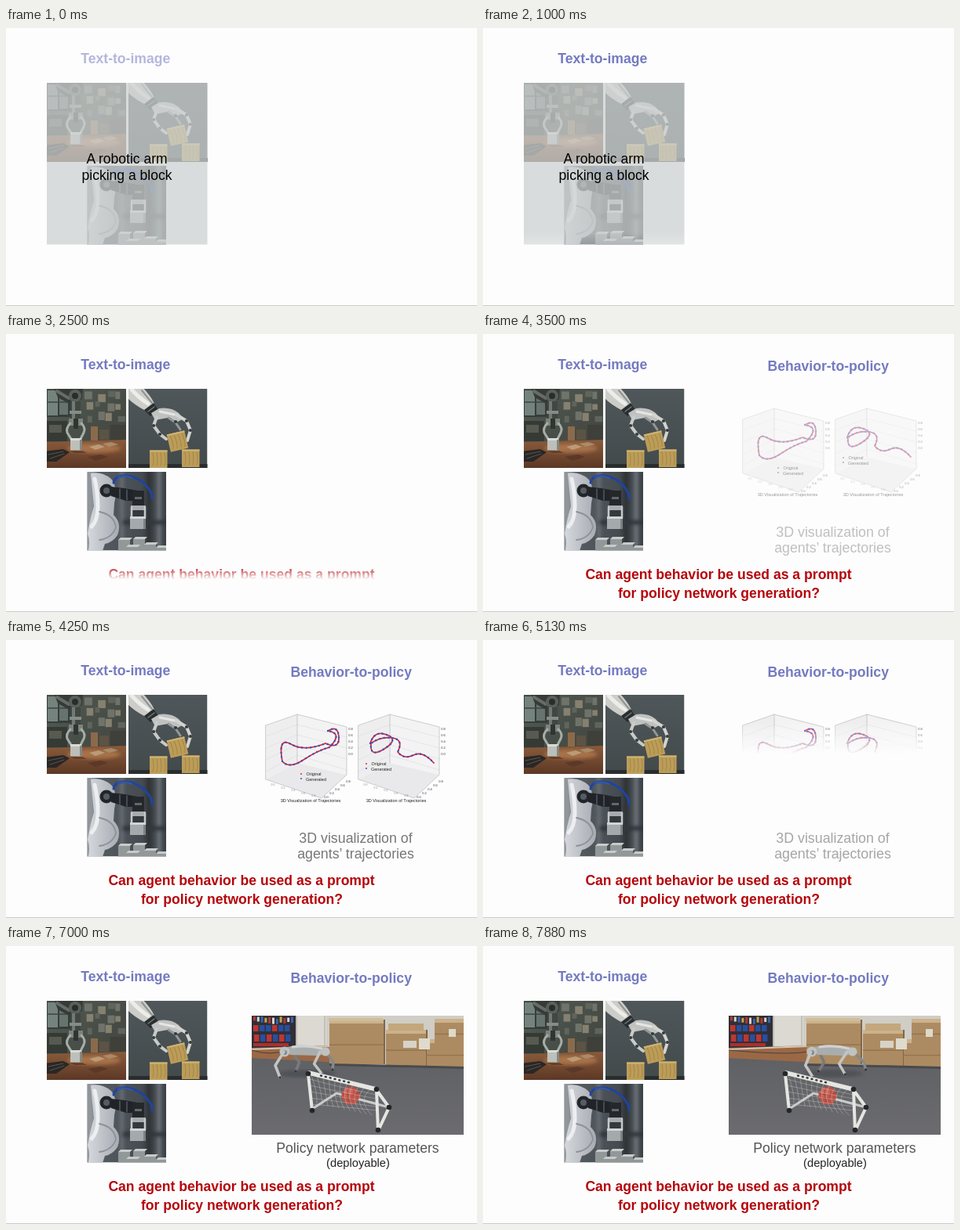
These frames come from a looping animation (600x355 px, 8 s). An HTML page:

```html
<!DOCTYPE html>
<html lang="en">
<head>
<meta charset="utf-8">
<title>Behavior to policy</title>
<style>
html, body { margin: 0; width: 100%; height: 100%; overflow: hidden; background: #fdfdfd; }
#stage { display: block; width: 600px; height: 355px; }
text { font-family: "Liberation Sans", Arial, sans-serif; text-anchor: middle; }
</style>
</head>
<body>
<svg id="stage" viewBox="0 0 600 355"></svg>
<script>
const LOOP = 8000, STEP = 125;
const stage = document.getElementById('stage');

// Drawing helpers
const rect = (x, y, w, h, fill, extra = '') =>
  `<rect x="${x}" y="${y}" width="${w}" height="${h}" fill="${fill}" ${extra}/>`;
const circle = (x, y, r, fill, extra = '') =>
  `<circle cx="${x}" cy="${y}" r="${r}" fill="${fill}" ${extra}/>`;
const shape = (d, fill, extra = '') => `<path d="${d}" fill="${fill}" ${extra}/>`;
const line = (d, color, width, extra = '') =>
  `<path d="${d}" fill="none" stroke="${color}" stroke-width="${width}" stroke-linejoin="round" stroke-linecap="round" ${extra}/>`;
const label = (str, x, y, size, fill, extra = '') =>
  `<text x="${x}" y="${y}" font-size="${size}" fill="${fill}" ${extra}>${str}</text>`;
const group = (id, content, extra = '') => `<g id="${id}" ${extra}>${content}</g>`;
const soft = (content, filter) => `<g filter="url(#${filter})">${content}</g>`;
// A clipped picture: plain backdrop plus slightly softened content
const photo = (x, y, w, h, backdrop, content) =>
  `<svg x="${x}" y="${y}" width="${w}" height="${h}" viewBox="${x} ${y} ${w} ${h}">` +
  rect(x, y, w, h, backdrop) + soft(content, 'lens') + '</svg>';
const blur = (id, amount) => `<filter id="${id}"><feGaussianBlur stdDeviation="${amount}"/></filter>`;
const gradient = (id, from, to, extra = '') =>
  `<linearGradient id="${id}" ${extra}><stop offset="0" stop-color="${from}"/><stop offset="1" stop-color="${to}"/></linearGradient>`;
const wipeMask = id =>
  gradient(id + 'Edge', '#fff', '#000', 'gradientUnits="userSpaceOnUse" x1="0" x2="0"') +
  `<mask id="${id}" maskUnits="userSpaceOnUse" x="0" y="0" width="600" height="355">${rect(0, 0, 600, 355, `url(#${id}Edge)`)}</mask>`;
const range = n => [...Array(n).keys()];
const BOLD = 'font-weight="bold"', DOWN = 'x1="0" y1="0" x2="0" y2="1"';

function random(seed) {
  return () => (seed = (seed * 16807) % 2147483647) / 2147483647;
}

function workshop() {
  const rnd = random(41);
  const papers = range(12).map(i =>
    rect(100 + (i % 4) * 13 + rnd() * 5, 71 + Math.floor(i / 4) * 14 + rnd() * 6, 5 + rnd() * 5, 6 + rnd() * 5,
      ['#6f736a', '#86806f', '#5f655d'][i % 3])).join('');
  return photo(52, 70, 101, 101, 'url(#wall)',
    rect(52, 71, 31, 35, '#363e3b') + rect(53, 72, 13, 32, '#75837e') + rect(68, 72, 11, 31, '#66736e') +
    line('M52 87H80', '#3d4642', 1.5) + papers +
    rect(50, 111, 28, 26, '#353a34') + rect(55, 116, 16, 10, '#565a50') +
    rect(108, 118, 9, 18, '#8b6a4b') + rect(119, 122, 12, 13, '#5d5344') + rect(133, 116, 22, 20, '#3e4039') +
    shape('M48 138L157 135V175H48Z', 'url(#table)') +
    soft('<ellipse cx="112" cy="146" rx="34" ry="6" fill="#b67d50" opacity=".75"/>', 'haze') +
    shape('M48 150L73 147 81 151 64 163H48Z', '#292725') + line('M54 154L73 150M56 159L74 153', '#5c554f', 1) +
    shape('M106 144l12-3 8 3-12 4Z', '#b99b7a') + shape('M123 140l11-2 9 3-12 3Z', '#a98a6b') +
    shape('M104 157l17-3 9 3-16 5Z', '#5b3827') +
    shape('M61 68H98L97 83 84 91 66 81Z', '#373b38') + line('M65 73L80 82', '#666c67', 4) +
    circle(88, 79, 8, '#59605b') + circle(88, 79, 4, '#292d2b') +
    rect(82, 86, 13, 23, '#414743') + rect(84, 86, 4, 23, '#727a74') + rect(81, 98, 15, 4, '#868d87') +
    rect(80, 108, 18, 9, '#7d847e') + rect(86, 108, 6, 13, '#303532') +
    line('M82 114Q76 120 78 126L83 134M96 114Q102 120 99 126L95 134', '#a6aea8', 3) +
    rect(82, 134, 13.5, 14.5, '#bdbfba') + rect(82, 133, 14, 3, '#dadbd6') + rect(94, 135, 3, 13, '#858781') +
    shape('M81 149H97L103 152H88Z', '#4a2c20', 'opacity=".6"'));
}

function woodBlock(x, y, size, angle = 0) {
  const grain = range(4).map(i => `M${x + 4 + i * size / 4.5} ${y + 3}q2 ${size / 2} 0 ${size - 6}`).join('');
  return `<g transform="rotate(${angle} ${x + size / 2} ${y + size / 2})">` +
    rect(x, y, size, size, '#bc9d58') + line(grain, '#a28449', 1) + rect(x, y, size, 2, '#d0b574') + '</g>';
}

function handWithBlocks() {
  return photo(156, 70, 100.5, 101, 'url(#slate)',
    rect(150, 166, 112, 8, '#292d2e') +
    shape('M152 66H172Q184 78 189 89L178 98Q163 91 152 79Z', '#cccdc9') +
    line('M160 71Q170 82 181 89', '#ecece8', 5) + line('M173 72L186 88', '#8f9392', 2) +
    shape('M176 97L188 88 194 97 184 105Z', '#292e30') + line('M181 99L189 93', '#74797a', 1.5) +
    shape('M185 101L195 95Q210 93 220 101L226 108 219 112 206 107 190 110Z', '#bfc2c0') +
    line('M196 99L215 103', '#e5e6e1', 3) +
    line('M192 106L188 117 196 128 204 134', '#c9cbc8', 4) +
    line('M217 103L230 111 235 123 231 136', '#d3d4d0', 4) + line('M207 107L216 113 222 122', '#929797', 3) +
    [[188, 117], [196, 128], [230, 111], [235, 123], [216, 112]].map(p => circle(...p, 2.1, '#353a3b')).join('') +
    woodBlock(207, 125.5, 23, -13) + woodBlock(183, 148.5, 22.5) + woodBlock(224, 147.5, 22.5));
}

function labArm() {
  const cubes = [[143, 263], [162, 262], [176, 269], [153, 272], [191, 273]].map(([x, y]) =>
    rect(x, y, 15, 15, '#929798') + shape(`M${x} ${y}l3-3h15l-3 3Z`, '#c7cbca')).join('');
  return photo(103.5, 176, 100.5, 100.5, 'url(#lab)',
    soft(rect(100, 172, 13, 108, '#91969b') + rect(145, 172, 5, 108, '#676d72') +
      rect(178, 172, 8, 108, '#303539') + rect(192, 172, 6, 108, '#6b7176') + rect(148, 237, 60, 7, '#33383c'), 'haze') +
    shape('M108 178Q122 175 134 185Q143 196 138 216L137 231Q148 241 142 257Q136 266 126 268L122 280H104Q108 266 104 255Q107 236 112 220Z', 'url(#metal)') +
    line('M113 185Q117 202 117 220T109 246', '#eceef0', 5) +
    line('M119 227Q138 231 140 247Q135 261 119 263', '#8c9299', 1.8) +
    circle(128, 200, 8.5, '#22262a') + circle(128, 200, 4, '#555c62') +
    shape('M134 195L151 197 173 201 174 213 153 213 134 207Z', '#202429') +
    line('M145 198V211M154 199V212', '#51585f', 1.5) +
    line('M137 190Q139 180 153 181T177 192T186 210', '#1e44a3', 3) + line('M142 183Q150 179 161 184', '#3a65c8', 1) +
    rect(161, 200, 15, 22, '#24282b') + rect(164, 208, 9, 3, '#63696d') +
    rect(159, 219, 19, 6, '#a7acae') + rect(161, 225, 15, 9, '#34393d') +
    line('M160 221V235M177 221V235', '#c4c9ca', 2.5) +
    rect(158, 234, 19, 15, '#a4aaab') + rect(158, 233, 20, 3, '#d0d5d5') + rect(175, 236, 3, 13, '#7b8284') +
    cubes);
}

function plot(x, path, legendX, legendY, titleX) {
  const ticks = range(5).map(i =>
    label('0.' + (8 - 2 * i), x + 108, 115 + i * 8, 4, '#333') +
    label('0.' + i * 2, x + 77 + i * 7, 202 - i * 5, 4, '#333') +
    label('0.' + i * 2, x + 9 + i * 13, 186 + i * 3.5, 3.5, '#888')).join('');
  const grid = range(4).map(i =>
    `M${x} ${123 + i * 15}L${x + 40} ${108 + i * 13}L${x + 103} ${124 + i * 14}`).join('');
  return shape(`M${x} 109L${x + 40} 95V157L${x} 178Z`, '#eeeeef') +
    shape(`M${x + 40} 95L${x + 103} 111V172L${x + 40} 157Z`, '#f3f3f4') +
    shape(`M${x} 178L${x + 40} 157 ${x + 103} 172 ${x + 71} 202Z`, '#e9e9eb') +
    line(grid, '#dcdcdf', .6) +
    line(`M${x} 109L${x + 40} 95 ${x + 103} 111V172L${x + 71} 202 ${x} 178ZM${x + 40} 95V157`, '#b9b9bd', .7) +
    line(path, '#d3263f', 1.7) + line(path, '#3155b7', 2.4, 'stroke-dasharray="0 5.5"') +
    circle(legendX - 16, legendY - 2, 1, '#d3263f') + circle(legendX - 16, legendY + 4, 1, '#3155b7') +
    label('Original', legendX, legendY, 5.5, '#222') + label('Generated', legendX + 3, legendY + 6.5, 5.5, '#222') +
    ticks + label('3D Visualization of Trajectories', titleX, 206.5, 5.6, '#222');
}

function network(layers, ring, edge) {
  const nodes = layers.map(([y, ...xs]) => xs.map(x => [x, y]));
  const links = nodes.slice(1).flatMap((row, i) =>
    row.flatMap(([x, y]) => nodes[i].map(([px, py]) => `M${px} ${py}L${x} ${y}`))).join('');
  return line(links, edge, 3) + line(links, '#fff', .7, 'opacity=".6"') +
    nodes.flat().map(([x, y]) => circle(x, y, 9.5, ring, 'opacity=".22"') +
      circle(x, y, 7.5, '#d7ead0', `stroke="${ring}" stroke-width="2.8"`)).join('');
}

const carton = (x, y, w, h) =>
  rect(x, y, w, h, '#ad8b62') + rect(x, y, w, 5, '#cbb28b') +
  rect(x, y + h * .55, w, 1.5, '#957550') + rect(x + w - 2, y, 2, h, '#80664a');

function arena() {
  const rnd = random(77);
  const tools = range(11).map(i => rect(315 + i * 4.8, 90 + rnd() * 3, 3, 5 + rnd() * 3,
    ['#b73834', '#d6d5cc', '#3b64a5', '#c5a649'][i % 4])).join('');
  const bins = range(6).map(i => rect(315 + i * 8, 101, 6.5, 8, i % 3 ? '#284f9e' : '#bd3632') +
    rect(316 + i * 8, 113, 6.5, 9, i % 2 ? '#284f9e' : '#bd3632')).join('');
  const net = range(11).map(i => `M${389 + i * 7.5} ${165 + i * 1.8}Q${397 + i * 5} ${187 + i} ${396 + i * 7} ${201 + i * 1.5}`).join('') +
    range(5).map(i => `M387 ${170 + i * 8}Q427 ${181 + i * 6} 472 ${190 + i * 5}`).join('');
  return photo(313, 89, 270, 152, '#cfcdc6',
    rect(371, 85, 37, 47, '#dbd9d1') + line('M370 89V129M406 89V130', '#aaa79f', 1) +
    rect(309, 85, 60, 46, '#302f38') + tools + bins + rect(315, 124, 45, 4, '#a9302d') +
    shape('M309 130L416 127V152L309 146Z', '#9b6846') + line('M310 132L414 128', '#d6c7b2', 2) +
    shape('M309 143L410 148 460 152 590 154V245H309Z', 'url(#carpet)') +
    carton(412, 94, 71, 57) + rect(411, 92, 69, 4, '#d2bc98') +
    carton(484, 107, 53, 46) + rect(487, 99, 45, 9, '#c4a77c') +
    carton(536, 119, 50, 36) + carton(546, 93, 42, 34) +
    rect(506, 121, 17, 9, '#d7d3c7') + rect(526, 118, 14, 14, '#dfdacd') + rect(564, 106, 9, 10, '#dfd9c9') +
    shape('M412 150L590 154V157L412 153Z', '#494a4d') +
    group('dog', '') +
    line('M390 208L421 188 488 206', '#c8c9c8', 3) +
    circle(439, 191, 11.5, '#bd5145') + circle(436, 187, 6, '#cc675a') +
    line('M428 188Q439 193 450 187M437 180Q432 191 439 202', '#914139', .8) +
    line(net, '#e0e1df', .6, 'opacity=".55"') +
    line('M386 162L472 183', '#e5e5e2', 5.5) + line('M401 165.5L438 174.5', '#393b3d', 2.5, 'stroke-dasharray="1 5"') +
    line('M385 164L390 210M472 184L474 236L488 206L472 184', '#e5e5e2', 4) +
    [[385, 163], [472, 183], [390, 210], [474, 235], [488, 206]].map(p => circle(...p, 3.3, '#242628')).join(''));
}

function dogPose(ms) {
  const x = 352 + (ms - 7000) * .073, swing = phase => Math.sin(ms / 95 + phase) * 4;
  const leg = (hip, knee, foot, ground, phase, color) => {
    const s = swing(phase), fx = x + foot + s;
    return line(`M${x + hip} 135L${x + knee + s / 2} ${(135 + ground) / 2 + 1}L${fx} ${ground}`, color, 3.5) +
      circle(fx, ground, 1.7, '#33363a');
  };
  return soft(`<ellipse cx="${x + 31}" cy="163" rx="37" ry="5" fill="#393b3e" opacity=".45"/>`, 'haze') +
    line(`M313 133Q${x - 15} 141 ${x + 5} 133`, '#34363a', .8) +
    leg(12, 20, 14, 160, 2.6, '#777b7d') + leg(55, 67, 68, 158, 0, '#85898a') +
    shape(`M${x + 2} 131Q${x + 15} 125 ${x + 32} 127L${x + 59} 130 ${x + 61} 137 ${x + 45} 140 ${x + 10} 139Z`, '#a9adad') +
    line(`M${x + 13} 129Q${x + 32} 126 ${x + 50} 131`, '#d0d2d1', 3) +
    circle(x + 3, 135, 6.5, '#bfc2c1') + circle(x + 3, 136, 3, '#81868a') + circle(x + 55, 135, 5.5, '#bfc2c1') +
    leg(2, -7, 1, 168, 0, '#c2c5c3') + leg(48, 39, 48, 164, 2.6, '#c2c5c3');
}

const TITLE = '#747ac0', QUESTION = '#b5060c';
stage.innerHTML =
  '<defs>' + blur('lens', .45) + blur('haze', 2) +
  gradient('wall', '#515b54', '#3e413a', 'x1="0" y1="0" x2="1" y2="1"') +
  gradient('table', '#8a5b3b', '#573423', DOWN) + gradient('slate', '#50575a', '#434a4c', DOWN) +
  gradient('lab', '#596067', '#3c4247') + gradient('metal', '#d5d8dc', '#a7abb2') +
  gradient('carpet', '#606164', '#6c6c70', DOWN) +
  ['promptWipe', 'questionWipe', 'plotWipe'].map(wipeMask).join('') + '</defs>' +
  rect(0, 0, 600, 355, '#fdfdfd') + rect(0, 354, 600, 1, '#cacaca') +
  group('leftTitle', label('Text-to-image', 152.3, 44.5, 17.6, TITLE, BOLD)) +
  workshop() + handWithBlocks() + labArm() +
  group('prompt', rect(52, 70, 204.5, 206.5, '#cdd2d2', 'opacity=".76"') +
    label('A robotic arm', 154, 173, 17.5, '#000') + label('picking a block', 154, 194, 17.5, '#000'), 'mask="url(#promptWipe)"') +
  group('question', label('Can agent behavior be used as a prompt', 300, 313, 17.6, QUESTION, BOLD) +
    label('for policy network generation?', 300.5, 336.5, 17.6, QUESTION, BOLD), 'mask="url(#questionWipe)"') +
  group('rightTitle', label('Behavior-to-policy', 439.7, 46.5, 17.6, TITLE, BOLD)) +
  group('plots',
    plot(331, 'M410 116Q423 108 424 124T407 132Q380 143 363 133T352 155Q361 165 379 153T412 137Q430 119 410 116', 392, 173, 388) +
    plot(449, 'M464 132Q469 115 485 121T482 139T465 132Q477 123 492 125T499 143Q507 153 519 147T545 157', 475, 160, 497),
    'mask="url(#plotWipe)"') +
  group('plotCaption', label('3D visualization of', 445.5, 259, 17.8, '#777') + label('agents’ trajectories', 445.5, 279, 17.8, '#777')) +
  group('networks',
    network([[122, 357, 388], [157, 345, 374, 404], [187, 374]], '#8492b9', '#bdc5de') +
    network([[81, 438, 473], [114, 428, 459, 491], [144, 442, 474]], '#f2994a', '#f9c596') +
    network([[166, 461, 490], [202, 440, 471, 501, 530], [237, 468, 503]], '#4a8c3c', '#b9dbad')) +
  group('policyCaption', label('Policy network parameters', 448, 264, 17.6, '#555')) +
  group('deploy', arena() + label('(deployable)', 448.5, 282, 14.7, '#222'));

const $ = id => document.getElementById(id);
const progress = (ms, from, to) => Math.max(0, Math.min(1, (ms - from) / (to - from)));
const fade = (id, value) => $(id).setAttribute('opacity', value);
function wipe(id, from, to, amount, softness) {
  const center = from + (to - from) * amount, edge = $(id + 'Edge');
  edge.setAttribute('y1', center - softness);
  edge.setAttribute('y2', center + softness);
}

function render(ms) {
  fade('leftTitle', .53 + .47 * progress(ms, 0, 450));
  wipe('promptWipe', 305, 42, progress(ms, 940, 1940), 28);
  wipe('questionWipe', 285, 355, progress(ms, 2250, 3150), 9);
  fade('rightTitle', progress(ms, 2800, 3300));
  fade('plots', progress(ms, 3250, 3800));
  wipe('plotWipe', 235, 65, progress(ms, 4480, 5480), 20);
  fade('plotCaption', progress(ms, 3250, 3800) * (1 - progress(ms, 4950, 5450)));
  fade('networks', progress(ms, 5500, 6000) * (1 - progress(ms, 6400, 6850)));
  fade('policyCaption', progress(ms, 5500, 6000));
  fade('deploy', progress(ms, 6400, 6850));
  $('dog').innerHTML = dogPose(ms);
}

const start = performance.now();
function tick() {
  const ms = (performance.now() - start) % LOOP;
  render(Math.floor(ms / STEP) * STEP);
  requestAnimationFrame(tick);
}
tick();
</script>
</body>
</html>
```
